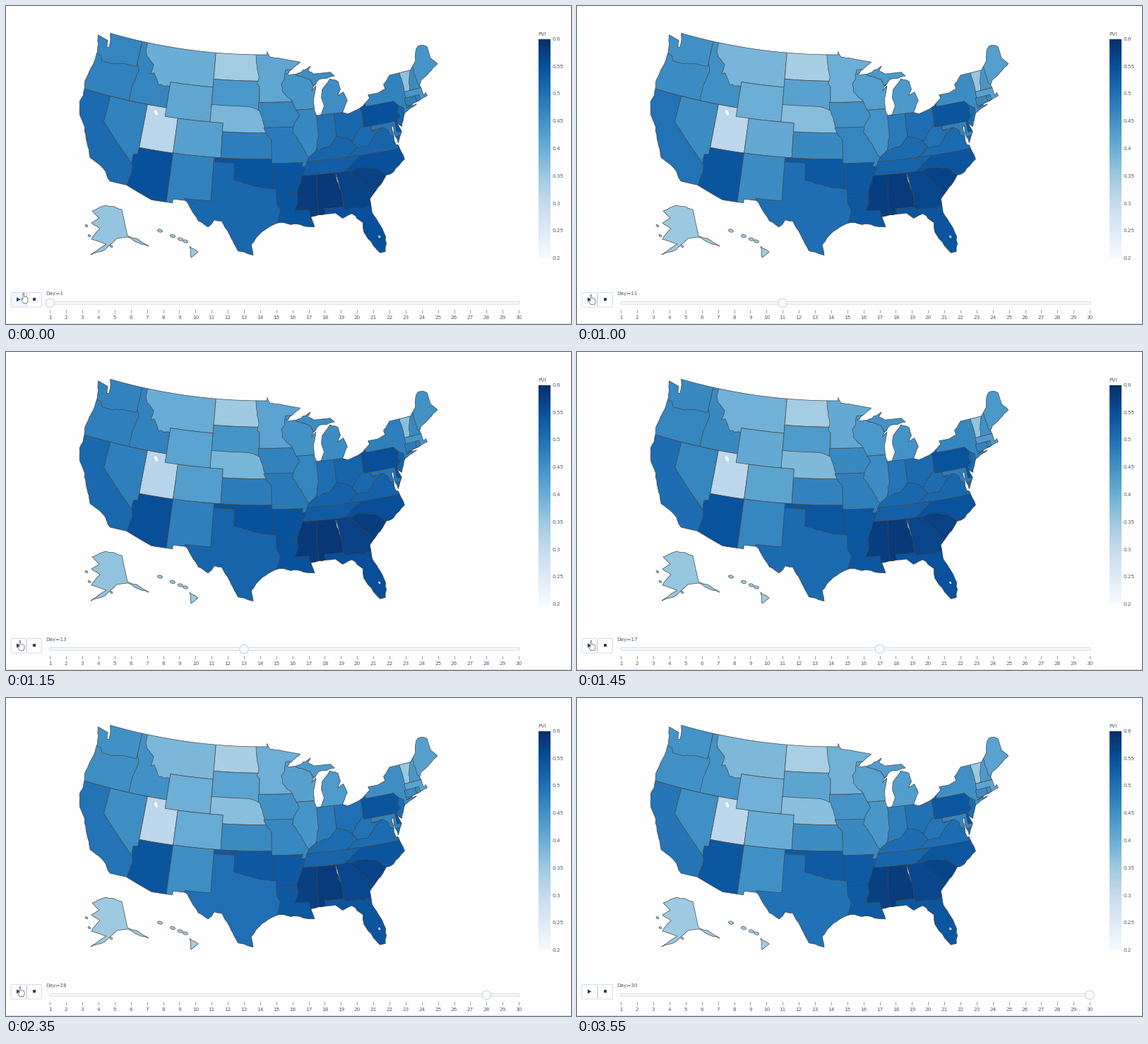
A matplotlib script for the animation above (3.7 s loop, 800 by 450 pixels).

```python
import numpy as np
import matplotlib.pyplot as plt
from matplotlib.animation import FuncAnimation
from matplotlib.patches import Polygon, Rectangle, FancyBboxPatch, Circle, Ellipse

W, H, FRAMES, STEP = 800, 450, 74, 50
PX = 0.72  # points per pixel at 100 dpi
INK, RIM, PALE = "#50596a", "#cbd3e0", "#f8fafc"
BORDER = {"ec": "#444444", "lw": 0.7 * PX}
BLUES = plt.get_cmap("Blues")

rng = np.random.default_rng(4)
fig = plt.figure(figsize=(8, 4.5), dpi=100, facecolor="#fefefe")
ax = fig.add_axes([0, 0, 1, 1])
ax.axis("off")
regions = []


def label(x, y, text, ha="left"):
    return ax.text(x, y, text, ha=ha, va="baseline", color=INK,
                   fontsize=7.3 * PX, family="DejaVu Sans")


def albers(lon, lat):
    """Equal-area conic projection, in stage pixels."""
    s1, s2 = np.sin(np.radians([29.5, 45.5]))
    n = (s1 + s2) / 2
    rho = np.sqrt(1 - s1 * s1 + 2 * n * s1 - 2 * n * np.sin(np.radians(lat))) / n
    theta = n * np.radians(96 - lon)
    return np.column_stack([362.8 + 703 * rho * np.sin(theta),
                            -705.7 + 703 * rho * np.cos(theta)])


def trace(points, unit=1.0):
    """Subdivide a ring; short slanted edges are natural ones and get rough."""
    ring = np.reshape(points, (-1, 2)).astype(float)
    parts = []
    for a, b in zip(ring, np.roll(ring, -1, axis=0)):
        size = np.hypot(*(b - a))
        k = max(1, int(size / (0.4 * unit)))
        edge = a + (b - a) * np.arange(k)[:, None] / k
        if size < 3 * unit and np.abs(b - a).min() > 0.04 * unit:
            edge[1:] += rng.normal(0, 0.045 * unit, (k - 1, 2))
        parts.append(edge)
    return np.vstack(parts)


def region(value, patch):
    ax.add_patch(patch)
    regions.append((patch, value))
    return patch


def cell(value, *lonlat):
    """A region given loosely: the land clips it, later cells cover it."""
    patch = Polygon(albers(*trace(lonlat).T), **BORDER)
    region(value, patch).set_clip_path(land)


def box(value, west, east, south, north):
    cell(value, west, north, east, north, east, south, west, south)


# Key points of the land's edge, degrees west and north
pacific = [122.75, 49, 122.4, 48.3, 122.3, 47.4, 122.6, 47.3, 122.8, 48.1, 124.7, 48.4,
           124.1, 46.9, 123.95, 45.5, 124.5, 42.85, 124.1, 41.2, 124.35, 40.4, 123.75, 39,
           122.5, 37.8, 121.9, 36.6, 120.6, 34.6, 119.2, 34.15, 118.4, 33.75, 117.12, 32.53]
south = [114.8, 32.5, 111.07, 31.33, 108.2, 31.33, 108.2, 31.78, 106.5, 31.78, 104.5, 29.6,
         103.15, 28.98, 102.4, 29.85, 101.4, 29.77, 100.3, 28.3, 99.1, 26.4, 97.15, 25.95]
gulf = [97.4, 27.2, 96.4, 28.35, 94.7, 29.4, 93.8, 29.7, 91.8, 29.5, 90.1, 29.1, 89.1, 29,
        89.5, 30.2, 88.4, 30.35, 86.2, 30.4, 85.3, 29.7, 84, 30.1, 82.7, 28.9, 82.75, 27.8,
        81.8, 26.1, 81.1, 25.15, 80.4, 25.2]
atlantic = [80.05, 26.9, 80.55, 28.4, 81.3, 29.9, 81.3, 31.5, 79.9, 32.7, 79.2, 33.2,
            78.55, 33.87, 77.95, 33.9, 76.55, 34.65, 75.55, 35.25, 76, 36.95, 76.35, 37.1,
            76.45, 39.1, 76.1, 39.3, 76.25, 38.5, 75.95, 37.2, 75.1, 38.4, 75.5, 39.5,
            74.9, 38.95, 74, 40.4, 71.9, 41.05, 73.6, 40.9, 71.9, 41.3, 70.65, 41.55,
            70, 41.65, 70.1, 42.05, 70.5, 41.8, 70.7, 43.1, 70.2, 43.6, 69, 44, 67, 44.85]
north = [67.8, 45.7, 67.8, 47.07, 68.3, 47.35, 69.2, 47.45, 70, 46.7, 70.3, 45.9, 71.1, 45.3,
         71.5, 45, 75, 45, 76.3, 44.1, 76.2, 43.55, 77.5, 43.27, 79.05, 43.27, 78.9, 42.85,
         80.5, 42, 82.7, 41.5, 83.45, 41.73]
lakes = [83.1, 42.2, 82.45, 43, 82.9, 44.05, 83.9, 43.7, 83.3, 44.4, 83.5, 45.3, 84.8, 45.75,
         85.6, 45.1, 86.25, 44.6, 86.5, 43.6, 86.2, 42.7, 86.8, 41.76, 87.5, 41.7, 87.8, 42.5,
         87.7, 43.8, 87.2, 45.1, 88, 44.55, 87.6, 45.1, 86.6, 45.8, 84, 46, 84.6, 46.5,
         87.4, 46.5, 88.3, 46.9, 87.8, 47.45, 90.4, 46.6, 92.05, 46.7, 89.5, 48, 93.3, 48.6,
         94.6, 48.7, 95.15, 49.38, 95.15, 49]
shore = albers(*trace(pacific + south + gulf + atlantic + north + lakes).T)
land = ax.add_patch(Polygon(shore, fc="none", ec="none"))

# West
box(.475, 125, 116.5, 42, 46.3)
cell(.47, 117.03, 49.1, 111.05, 49.1, 111.05, 42, 117.03, 42, 117.03, 43.8, 116.5, 45.6,
     117.03, 46.4)
cell(.47, 125, 49.1, 117.03, 49.1, 117.03, 46, 119, 46, 121.2, 45.65, 122.8, 45.65,
     123.2, 46.2, 125, 46.3)
cell(.40, 116.05, 49.1, 104.05, 49.1, 104.05, 45, 111.05, 45, 111.05, 44.5, 112.9, 44.45,
     113.95, 45.7, 114.5, 45.55, 114.3, 46.65, 115.7, 47.45, 116.05, 48)
box(.51, 125, 114, 32, 42)
cell(.475, 120, 42, 114.05, 42, 114.05, 36.2, 114.6, 35, 120, 39)
cell(.55, 114.05, 37, 109.05, 37, 109.05, 31, 114.8, 31, 114.7, 32.7, 114.4, 34.1,
     114.6, 35, 114.7, 36.1, 114.05, 36.2)
box(.315, 114.05, 109.05, 37, 42)
box(.415, 111.05, 104.05, 41, 45)
box(.425, 109.05, 102.05, 37, 41)

# Plains and south centre
box(.515, 107, 93.4, 25, 36.5)
cell(.475, 109.05, 37, 103.05, 37, 103.05, 32, 106.6, 32, 106.5, 31, 109.05, 31)
cell(.545, 103, 37, 94.4, 37, 94.4, 33.6, 96.2, 33.75, 98.1, 34.15, 100, 34.56, 100, 36.5,
     103, 36.5)
box(.48, 102.05, 94.6, 37, 40)
box(.345, 104.05, 96.5, 45.94, 49.1)
box(.44, 104.05, 96.45, 42.4, 45.94)
box(.47, 96.6, 90.1, 40.5, 43.5)
cell(.385, 104.05, 43, 98.5, 43, 97.2, 42.8, 96.4, 42.5, 95.3, 40, 102.05, 40, 102.05, 41,
     104.05, 41)
cell(.415, 97.23, 49.6, 89, 49.6, 89, 47.6, 92.05, 46.7, 92, 45, 91.2, 43.5, 96.45, 43.5,
     96.45, 45.3, 96.85, 45.6, 96.55, 46.3, 96.85, 47.6)
cell(.545, 94.62, 36.5, 89.6, 36.5, 90, 34, 91, 33, 94.04, 33, 94.04, 33.55, 94.46, 33.6,
     94.43, 35.4)
cell(.485, 95.77, 40.6, 91, 40.6, 89, 38, 89, 36.9, 89.5, 36.5, 89.7, 36, 90.37, 36,
     90.1, 36.5, 94.62, 36.5, 94.6, 39.1)
cell(.545, 94.04, 33, 90.5, 33, 89.3, 30.1, 88.5, 30, 88.5, 28.5, 94.2, 29, 93.8, 30.3,
     93.55, 31.2, 94.04, 32)
cell(.445, 92.05, 47.2, 92.3, 46.1, 92.85, 45.6, 92.75, 44.75, 91.2, 43.5, 90.64, 42.5,
     86.8, 42.5, 86.8, 45.4, 87.6, 45.1, 88.1, 45.9, 90.4, 46.55, 90.4, 47.2)

# Southeast
box(.55, 88, 79.5, 24.5, 31)
box(.52, 84, 75, 36.55, 39.6)
box(.55, 84.3, 75, 33.5, 36.57)
cell(.57, 85.6, 35, 80.8, 35, 80.8, 30.7, 82.05, 30.7, 82.1, 30.4, 82.2, 30.57, 84.86, 30.7,
     85, 31, 85, 32.3)
cell(.58, 91.15, 33, 90.3, 35, 88, 35, 88, 30, 89.55, 30.1, 89.73, 31, 91.6, 31, 91.1, 32.2)
cell(.585, 88.2, 35, 85.6, 35, 85, 32.3, 85, 31, 87.6, 31, 87.5, 30, 88.4, 30, 88.47, 31.9)
cell(.575, 83.1, 35, 82.3, 35.2, 81.05, 35.1, 79.67, 34.8, 78.5, 33.85, 78.5, 32, 80.9, 32,
     81.5, 33, 83.35, 34.7)
cell(.53, 90.3, 35, 84.3, 35, 83, 35.8, 81.68, 36.58, 89.5, 36.55, 89.7, 36)

# Lakes and northeast
box(.50, 88.1, 84.82, 37.8, 41.75)
box(.515, 84.82, 80.52, 38.4, 42.3)
cell(.52, 89.5, 36.55, 83.68, 36.6, 82, 37.5, 82.6, 38.2, 83.2, 38.7, 84.8, 39.1, 86, 38.1,
     88, 37.8, 89.15, 37)
cell(.465, 90.64, 42.5, 87, 42.5, 87.53, 41.7, 87.53, 39.3, 88, 37.8, 89.1, 37, 89.5, 37.3,
     90.2, 38.6, 91.4, 40, 91.1, 40.9, 90.2, 41.8)
cell(.455, 90.4, 46.55, 90, 47.3, 88, 47.8, 82, 47, 82, 41.73, 87, 41.73, 86.8, 45.4,
     87.6, 45.1, 88.1, 45.9)
cell(.51, 82.6, 38.2, 81.75, 39.2, 80.7, 39.9, 80.52, 40.6, 80.52, 39.72, 79.48, 39.72,
     79.48, 39.2, 77.75, 39.3, 78.9, 38.8, 80.3, 37.55, 82, 37.5)
box(.475, 80, 71.8, 40.4, 45.1)
cell(.49, 79.48, 39.72, 75.4, 39.72, 75, 38, 75.9, 37.95, 76.3, 38, 77, 38.3, 77.05, 38.85,
     77.7, 39.3, 79.48, 39.2)
box(.55, 75.78, 75, 38.45, 39.8)
cell(.55, 80.52, 42.4, 79.76, 42.4, 79.76, 42, 75.35, 42, 74.7, 41.36, 75.1, 40.6,
     74.75, 40.2, 75.5, 39.72, 80.52, 39.72)
cell(.52, 74.7, 41.36, 74, 41, 74.1, 40.5, 73.8, 40.3, 73.8, 38.8, 74.9, 38.8, 75.5, 39.5,
     75.4, 39.8, 74.75, 40.2, 75.1, 40.6)
box(.44, 73.35, 69.5, 41.3, 42.75)
box(.48, 73.55, 71.8, 41.15, 42.03)
box(.475, 71.8, 71.2, 41.3, 42.03)
box(.46, 72.5, 70.5, 42.75, 45.4)
cell(.365, 73.4, 45.1, 71.5, 45.1, 72.1, 44, 72.5, 42.75, 73.27, 42.75, 73.25, 43.6)
cell(.445, 71.05, 45.4, 71.05, 48, 66, 48, 66, 43, 70.7, 43.05, 70.97, 43.4)
ax.add_patch(Polygon(shore, fc="none", **BORDER))

# Insets, in pixels
arctic = [122, 290, 141, 282, 164, 288, 172, 325, 185, 329, 202, 340, 187, 335, 172, 327,
          157, 329, 140, 345, 120, 352, 142, 337, 121, 330, 133, 315, 121, 307, 132, 300]
big_isle = [260, 340, 272, 348, 262, 356]
for value, ring in ((.36, arctic), (.35, big_isle)):
    region(value, Polygon(trace(ring, 12), **BORDER))
for x, y in ((114, 311), (118, 325), (149, 340)):
    region(.36, Ellipse((x, y), 4, 2.5, angle=30, **BORDER))
for s in (0, .5, .8, 1):
    region(.35, Ellipse((218 + 36 * s, 318 + 15 * s), 7, 4, angle=15, **BORDER))
for x, y, w, h in ((212.5, 151, 4, 8), (528.7, 326.5, 2.5, 3.5)):
    ax.add_patch(Ellipse((x, y), w, h, angle=-25, fc="white"))

# Colour scale
ax.imshow(np.linspace(1, 0, 310)[:, None], cmap=BLUES, vmin=0, vmax=1, aspect="auto",
          extent=(754, 771, 357, 47))
label(753.5, 41.5, "PVI")
for i in range(9):
    label(773.5, 49 + 38.75 * i, f"{0.6 - 0.05 * i:.2f}".rstrip("0"))


# Controls
def rounded(x, y, w, h, r, fc):
    return ax.add_patch(FancyBboxPatch((x, y), w, h, fc=fc, ec=RIM, lw=0.8 * PX,
                                       boxstyle=f"round,pad=0,rounding_size={r}"))


def slot(day):
    return 62.3 + (day - 1) * 22.89


play = rounded(7, 405.5, 21.5, 20.5, 2, "white")
rounded(29.5, 405.5, 21, 20.5, 2, "white")
ax.add_patch(Polygon([(15, 412.3), (20.5, 415.4), (15, 418.5)], fc="#2a3f5f"))
ax.add_patch(Rectangle((38, 413.4), 4, 4, fc="#2a3f5f"))
rounded(61.5, 418.3, 665.5, 3.8, 1.5, PALE)
knob = ax.add_patch(Circle((62, 420.3), 6.3, fc=PALE, ec="#bec8d9", lw=0.8 * PX))
for d in range(1, 31):
    ax.plot([slot(d)] * 2, [430, 433.5], color="#777777", lw=0.7 * PX)
    label(slot(d), 443.3, str(d), "center")
ax.plot([0, W], [449.2, 449.2], color="#d9dce2", lw=PX)
caption = label(56.5, 408.8, "")

HAND = np.array([(3, 0), (4.6, 0), (5, 5), (8, 5.3), (10, 6.8), (10, 11), (8.6, 14),
                 (3.6, 14), (0, 8), (1.2, 7.4), (3, 9)])
ARROW = np.array([(0, 0), (0, 11), (2.6, 8.8), (4.4, 12.6), (6, 12), (4.4, 8.2), (7.8, 8)])
pointer = ax.add_patch(Polygon(HAND, fc="white", ec="#555555", lw=0.7 * PX, zorder=9))

ax.set_xlim(0, W)
ax.set_ylim(H, 0)


def day_at(frame):
    keys = [1, 9, 19, 22, 34, 42, 45, 46, 48, 49]
    days = [1, 5, 11, 13, 21, 26, 27, 28, 29, 30]
    return int(np.interp(frame, keys, days) + 1e-6)


def index_at(value, day):
    """Middling values sink the most over the month, with a rebound on day 13."""
    drift = np.interp(day, [1, 5, 11, 13, 21, 28, 30], [0, .55, .75, 0, .6, .85, 1])
    rebound = .004 * max(0, 1 - abs(day - 13) / 2)
    return value + rebound - .024 * drift * np.exp(-((value - .45) / .1) ** 2)


def place_pointer(frame):
    pointer.set_visible(frame < 55 or 62 <= frame < 71)
    if frame < 54:
        s = min(frame / 3, 1)
        pointer.set_xy(HAND + (21 - 5 * s, 406.5 + 2.2 * s))
    elif frame < 55:
        pointer.set_xy(ARROW + (208, 438))
    else:
        s = np.clip((frame - 62) / 8, 0, 1)
        s = s * s * (3 - 2 * s)
        pointer.set_xy(ARROW + (487 + 289 * s, 440 - 401 * s))


def draw(frame):
    day = day_at(frame)
    for patch, value in regions:
        patch.set_facecolor(BLUES((index_at(value, day) - .2) / .4))
    caption.set_text(f"Day={day}")
    knob.center = slot(day_at(frame - 1)), 420.3
    play.set_facecolor("#f0f6fd" if frame < 3 else "white")
    place_pointer(frame)
    return []


anim = FuncAnimation(fig, draw, frames=FRAMES, interval=STEP, repeat=True, repeat_delay=0)
plt.show()
```
